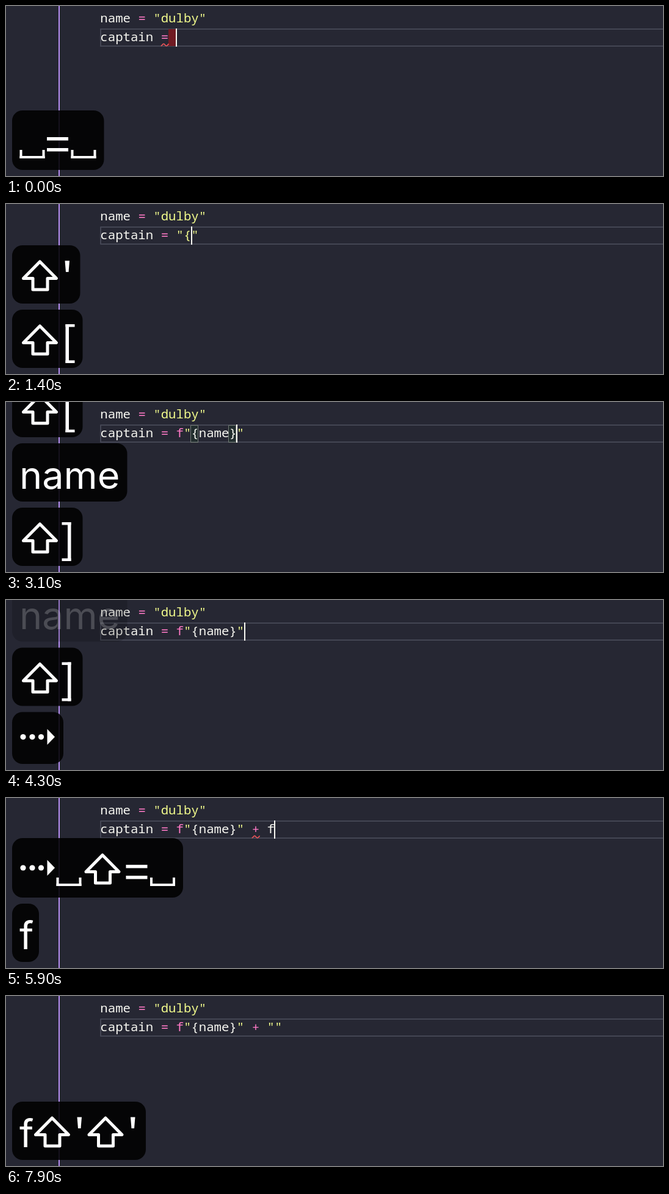
Recreate the animation shown at these times as an HTML page with a canvas. Size 1076 by 280 pixels, loop 8 s.

```html
<!DOCTYPE html>
<html lang="en">
<head>
<meta charset="utf-8">
<title>Typing an f-string</title>
<style>
  html, body { margin: 0; width: 100%; height: 100%; overflow: hidden; background: #262733; }
  canvas { display: block; }
</style>
</head>
<body>
<canvas id="stage" width="1076" height="280"></canvas>
<script>
const ctx = document.getElementById("stage").getContext("2d");
const LOOP = 8000, TICK = 100, BLINK = 480;
const WHITE = "#f8f8f2", PINK = "#ff79c6", YELLOW = "#f1fa8c", RED = "#f4555a";
const LEFT = 154.3, CHAR = 12.42;
const column = n => LEFT + n * CHAR;

// Code after "captain = ": [time, cursor column, coloured runs]
const fstring = [[PINK, "f"], [YELLOW, '"'], [WHITE, "{name}"], [YELLOW, '"']];
const sum = [...fstring, [WHITE, " "], [PINK, "+"]];
const edits = [
  [0, 10, []],
  [100, 11, [[YELLOW, '""']]],
  [1400, 12, [[YELLOW, '"{"']]],
  [1900, 13, [[YELLOW, '"{n"']]],
  [2000, 14, [[YELLOW, '"{na"']]],
  [2200, 15, [[YELLOW, '"{nam"']]],
  [2300, 16, [[YELLOW, '"{name"']]],
  [2700, 17, [[YELLOW, '"{name}"']]],
  [2800, 18, fstring],
  [4000, 19, fstring],
  [4500, 20, fstring],
  [4800, 21, sum],
  [5100, 22, sum],
  [5900, 23, [...sum, [WHITE, " f"]]],
  [6200, 23, [...sum, [YELLOW, ' ""']]],
  [6450, 24, [...sum, [YELLOW, ' ""']]],
];
const trailingSpaces = [[0, 100, 9], [4500, 4800, 19], [5100, 5900, 21]];
const squiggles = [[0, 300, 8], [5400, 6600, 20]];
const matches = [[2800, 4000, 12], [2800, 4000, 17]];

// Pressed keys, one row per group: when it starts to fade, and [time, keys]
const FADE = [0.53, 0.2, 0.04];
const rows = [
  { fade: 500, keys: [[0, "␣=␣"]] },
  { fade: 2000, keys: [[100, "⇧'"]] },
  { fade: 3300, keys: [[1400, "⇧["]] },
  { fade: 4200, keys: [[1900, "n"], [2000, "a"], [2200, "m"], [2300, "e"]] },
  { fade: 4800, keys: [[2700, "⇧]"]] },
  { fade: 7000, alphas: [0.53, ...FADE], keys: [[4000, "⇥"], [4500, "␣"], [4800, "⇧="], [5100, "␣"]] },
  { fade: LOOP, keys: [[5900, "f"], [6200, "⇧'"], [6450, "⇧'"]] },
];

function rect(color, x, y, w, h) {
  ctx.fillStyle = color;
  ctx.fillRect(x, y, w, h);
}

function polygon(points) {
  ctx.beginPath();
  points.forEach(([x, y]) => ctx.lineTo(x, y));
  ctx.closePath();
}

const bars = (...boxes) => () => boxes.forEach(box => ctx.fillRect(...box));

// Key symbols relative to pen position and baseline
const symbols = {
  "␣": { width: 42.5, draw: bars([0.5, -11, 4, 14], [37.5, -11, 4, 14], [0.5, -1, 41, 4]) },
  "=": { width: 41.5, draw: bars([2.5, -32, 35, 5.5], [2.5, -14, 35, 5.5]) },
  "[": { width: 22, draw: bars([6, -51, 5.5, 64], [6, -51, 15, 4.5], [6, 8.5, 15, 4.5]) },
  "]": { width: 22, draw: bars([9.5, -51, 5.5, 64], [0, -51, 15, 4.5], [0, 8.5, 15, 4.5]) },
  "'": { width: 18, draw() {
    polygon([[5, -49.5], [12.5, -49.5], [11, -31], [6.5, -31]]);
    ctx.fill();
  } },
  "⇧": { width: 69.5, draw() {
    polygon([[33.5, -48], [60.5, -20.5], [46, -20.5], [46, -2], [22, -2], [22, -20.5], [6.5, -20.5]]);
    ctx.stroke();
  } },
  "⇥": { width: 60, draw() {
    for (const x of [6, 21, 35.5]) {
      ctx.beginPath();
      ctx.arc(x, -27, 4.6, 0, 2 * Math.PI);
      ctx.fill();
    }
    polygon([[45.5, -40], [58, -27], [45.5, -14]]);
    ctx.fill();
  } },
};

function keyWidth(key) {
  if (symbols[key]) return symbols[key].width;
  return key === "f" ? 20 : ctx.measureText(key).width;
}

function rowMetrics(keys) {
  if (keys === "⇥") return { height: 85.5, baseline: 68 };
  return keys.includes("␣") ? { height: 98, baseline: 76 } : { height: 96, baseline: 75 };
}

function drawRow(keys, top, height, baseline) {
  const width = [...keys].reduce((total, key) => total + keyWidth(key), 24);
  ctx.fillStyle = "rgba(0,0,0,.88)";
  ctx.beginPath();
  ctx.roundRect(10, top, width, height, 17);
  ctx.fill();
  ctx.fillStyle = ctx.strokeStyle = "#fff";
  ctx.lineWidth = 5;
  let x = 22;
  for (const key of keys) {
    ctx.save();
    ctx.translate(x, top + baseline);
    if (symbols[key]) symbols[key].draw();
    else ctx.fillText(key, 0, 0);
    ctx.restore();
    x += keyWidth(key);
  }
}

function drawKeys(t) {
  ctx.font = "63px Inter, sans-serif";
  ctx.lineJoin = "round";
  let bottom = 270;
  for (const { fade, alphas = FADE, keys } of [...rows].reverse()) {
    const pressed = keys.filter(([time]) => time <= t).map(([, key]) => key).join("");
    if (!pressed) continue;
    const { height, baseline } = rowMetrics(pressed);
    ctx.globalAlpha = t < fade ? 1 : alphas[Math.floor((t - fade) / TICK)] || 0;
    drawRow(pressed, bottom - height, height, baseline);
    bottom -= height + 10;
  }
  ctx.globalAlpha = 1;
}

function drawText(runs, baseline) {
  let col = 0;
  for (const [color, text] of runs) {
    ctx.fillStyle = color;
    ctx.fillText(text, column(col), baseline);
    col += text.length;
  }
}

function drawSquiggle(x) {
  ctx.strokeStyle = RED;
  ctx.lineWidth = 1.6;
  ctx.beginPath();
  for (let dx = 0; dx <= 13; dx += 0.5) {
    ctx.lineTo(x + dx, 64 + 1.6 * Math.cos(dx * Math.PI / 4.5));
  }
  ctx.stroke();
}

function drawCode(t) {
  const [time, cursor, runs] = edits.findLast(edit => edit[0] <= t);
  const during = (spans, draw) => spans.forEach(([from, to, col]) => {
    if (t >= from && t < to) draw(column(col));
  });

  ctx.strokeStyle = "#444654";
  ctx.lineWidth = 2;
  ctx.strokeRect(155, 38, 930, 28);
  during(trailingSpaces, x => rect("#701b23", Math.round(x), 38, 12, 28));
  during(matches, x => {
    rect("rgba(0,100,0,.1)", Math.round(x), 38, 12, 28);
    ctx.strokeStyle = "#737a75";
    ctx.lineWidth = 1;
    ctx.strokeRect(Math.round(x) - 0.5, 38.5, 12, 28);
  });

  ctx.font = "20.7px 'Noto Sans Mono', monospace";
  drawText([[WHITE, "name "], [PINK, "="], [YELLOW, ' "dulby"']], 27);
  drawText([[WHITE, "captain "], [PINK, "="], [WHITE, " "], ...runs], 58);
  during(squiggles, drawSquiggle);
  if (Math.floor((t - time) / BLINK) % 2 === 0) {
    rect(WHITE, Math.floor(column(cursor)), 37, 2, 30);
  }
}

function frame(now) {
  const t = Math.floor(now % LOOP / TICK) * TICK;
  rect("#262733", 0, 0, 1076, 280);
  rect("#b78ff2", 86, 0, 2, 280);
  drawCode(t);
  drawKeys(t);
  requestAnimationFrame(frame);
}
requestAnimationFrame(frame);
</script>
</body>
</html>
```
